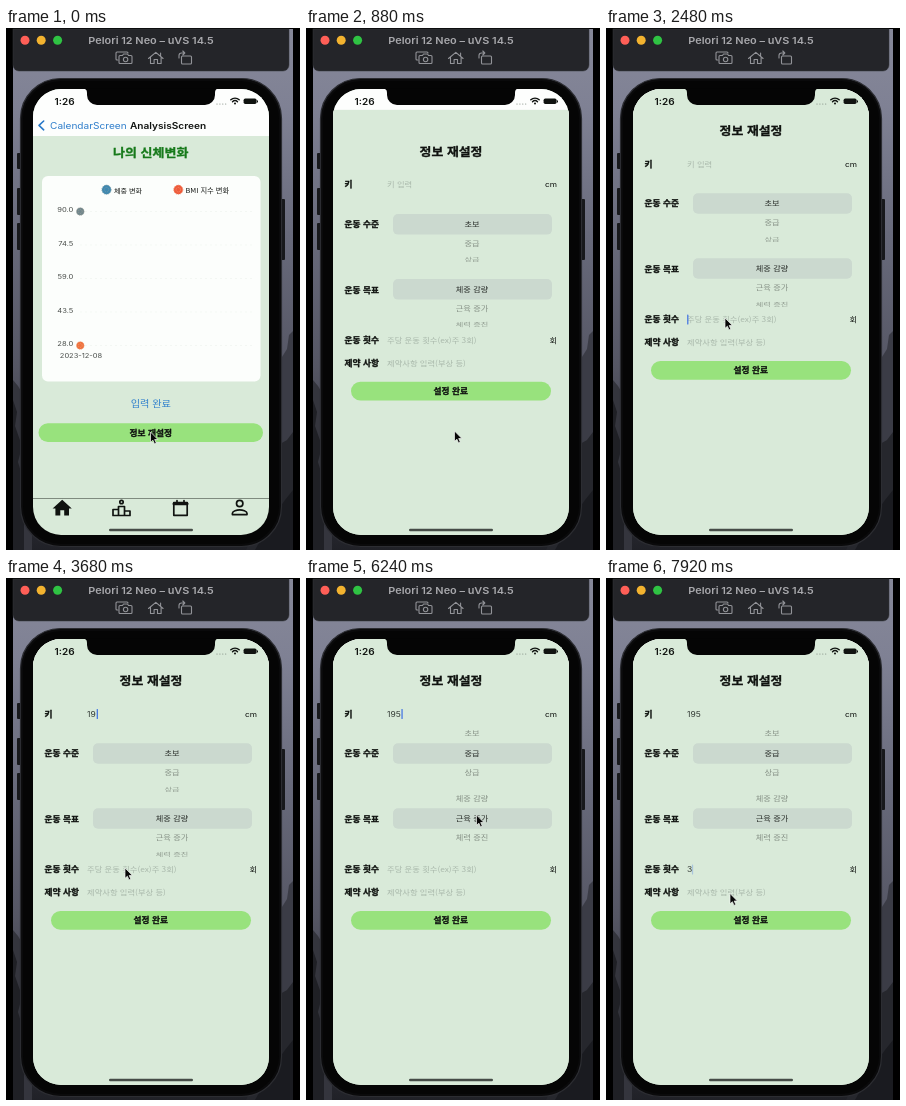
Animation of 294 by 522 pixels, one loop 8 s. Source, as an HTML page:

```html
<!DOCTYPE html>
<html lang="ko">
<head>
<meta charset="utf-8">
<title>Profile reset</title>
<style>
html, body { margin: 0; width: 100%; height: 100%; overflow: hidden; background: #000; }
svg { display: block; width: 294px; height: 522px; }
text { font-family: "Noto Sans CJK KR", "Noto Sans CJK", sans-serif; white-space: pre; }
.latin { font-family: Inter, "Open Sans", sans-serif; }
</style>
</head>
<body>
<svg id="stage" viewBox="0 0 294 522" xmlns="http://www.w3.org/2000/svg"></svg>
<script>
const LOOP = 8000;
const PAGE = '#d9ead9', BUTTON = '#98e27d', INK = '#101310', HINT = '#a9b8ab';
const ASPECT = 1.14;

const text = (x, y, width, str, o = {}) => {
  const size = width / ASPECT, fill = o.fill || INK;
  return `<text ${o.id ? `id="${o.id}"` : ''} class="${o.latin ? 'latin' : ''}"
    transform="translate(${x} ${(y + size * 0.37).toFixed(2)}) scale(${ASPECT} 1)"
    font-size="${size.toFixed(2)}" font-weight="${o.weight || 400}" fill="${fill}"
    ${o.weight === 900 ? `stroke="${fill}" stroke-width=".3"` : ''}
    text-anchor="${o.anchor || 'start'}">${str}</text>`;
};
const mid = (x, y, width, str, o = {}) => text(x, y, width, str, { anchor: 'middle', ...o });
const rect = (x, y, w, h, r, fill, extra = '') =>
  `<rect x="${x}" y="${y}" width="${w}" height="${h}" rx="${r}" fill="${fill}" ${extra}/>`;
const circle = (x, y, r, fill, extra = '') =>
  `<circle cx="${x}" cy="${y}" r="${r}" fill="${fill}" ${extra}/>`;
const path = (d, extra) => `<path d="${d}" ${extra}/>`;
const line = (color, w) =>
  `fill="none" stroke="${color}" stroke-width="${w}" stroke-linejoin="round" stroke-linecap="round"`;

// Spotted chart marker
const marker = (x, y, r, fill, dots) =>
  circle(x, y, r - 0.4, fill) +
  circle(x, y, r - 0.4, 'none', `stroke="${dots}" stroke-width="1" stroke-dasharray="1 1.1"`) +
  circle(x, y, r * 0.45, 'none', `stroke="${dots}" stroke-width=".8" stroke-dasharray=".9 1"`);

const wallpaper = () =>
  rect(7, 1, 280, 521, 0, 'url(#sky)') +
  path('M7 352l5 6 6 10 8 30v124H7z', 'fill="#34353d"') +
  path('M7 372l4 12-2 14 7 20-4 16 6 20v68H7z', 'fill="#1f2025"') +
  path('M287 303l-4 4-2 14-5 8-4 60v133h15z', 'fill="#3b3c46"') +
  path('M287 404l-6 8-7 4-14 60-20 46h47z', 'fill="#26272d"') +
  path('M287 462l-8 10-10 14-20 36h38z', 'fill="#1a1b20"');

const toolbar = () =>
  path('M7 1H283V37a6 6 0 0 1-6 6H13a6 6 0 0 1-6-6z', 'fill="#242529" stroke="#37383d" stroke-width=".5"') +
  circle(19, 12.2, 4.5, '#fe5f57') + circle(35.2, 12.2, 4.5, '#f3b32f') + circle(51.6, 12.2, 4.5, '#2fc343') +
  mid(145, 12, 10.9, 'Pelori 12 Neo – uVS 14.5', { latin: 1, weight: 600, fill: '#a9a9ad' }) +
  `<g ${line('#929398', 1.1)}>
    <path d="M112 32h-1a1 1 0 0 1-1-1v-6a1 1 0 0 1 1-1h10a1 1 0 0 1 1 1"/>
    <path d="M114 27.5h2.5l1-1.5h4l1 1.5h2.5a1 1 0 0 1 1 1v6a1 1 0 0 1-1 1h-11a1 1 0 0 1-1-1v-6a1 1 0 0 1 1-1z"/>
    <circle cx="119.6" cy="31.5" r="2.2"/>
    <path d="M142.5 30.5l7.3-6.2 7.3 6.2M144.5 29.5v6h3.6v-4h3.4v4h3.6v-6M154.6 25v2.5"/>
    <path d="M176.5 28h8a1 1 0 0 1 1 1v6a1 1 0 0 1-1 1h-8a1 1 0 0 1-1-1v-6a1 1 0 0 1 1-1z"/>
    <path d="M173 30v-2.5a2.5 2.5 0 0 1 2.5-2.5h3M176.8 23l2 2-2 2"/>
  </g>`;

const phone = () =>
  [[125, 16], [160, 27], [195, 27]].map(([y, h]) => rect(11, y, 5, h, 1, '#17181b')).join('') +
  rect(274, 171, 5, 61, 1, '#17181b') +
  rect(14.5, 50.5, 261, 468, 40, '#0a0a0b', 'stroke="#2c2d32" stroke-width="1.2"') +
  rect(17, 53, 256, 463, 38, '#050505');

const statusBar = () =>
  path('M76 60.5H213C210 60.5 209 62 209 65V67a10 10 0 0 1-10 10H91a10 10 0 0 1-10-10V65C81 62 80 60.5 76 60.5z', 'fill="#050505"') +
  text(48.5, 73.5, 10, '1:26', { latin: 1, weight: 600 }) +
  [0, 1, 2, 3].map(i => circle(211 + i * 2.9, 76, 0.6, '#7c877d')).join('') +
  path('M224.8 71.8a6 6 0 0 1 8.4 0M226.5 73.7a3.6 3.6 0 0 1 5 0', line(INK, 1.4)) +
  circle(229, 75.5, 1, INK) +
  rect(237.6, 70.6, 13, 5.4, 1.7, INK) + rect(251, 72.2, 1, 2.2, 0.5, INK);

const tabBar = () =>
  path('M27 470.5H263', 'stroke="#59645a" stroke-width=".7"') +
  path('M56.2 471.8L46.6 480.6H49.4V487.6H54.3V482.3H58.2V487.6H63V480.6H65.8z', `fill="${INK}"`) +
  `<g ${line(INK, 1.7)}>
    <path d="M107 487.5v-6h5.5v6zM112.5 487.5v-9h6v9zM118.5 487.5v-4.5h5.5v4.5z"/>
    <circle cx="115.5" cy="474" r="1.7"/>
    <path d="M167.8 474.5h13.4v12.8h-13.4zM171 474v-1.5M178 474v-1.5"/>
    <path d="M168 475.8h13" stroke-width="3"/>
    <circle cx="233.7" cy="475.5" r="3.2"/>
    <path d="M226.4 486.6v-1.3c0-2.3 4.6-3.500 7.300-3.500s7.300 1.200 7.300 3.500v1.300z"/>
  </g>`;

const chart = () => {
  const ticks = ['90.0', '74.5', '59.0', '43.5', '28.0'];
  return rect(36, 148, 218.5, 205.5, 6, '#fcfefc') +
    marker(100.5, 161.7, 5, '#3f88b0', '#7f9fa6') + text(108, 162.5, 7.1, '체중 변화') +
    marker(172.3, 161.7, 5, '#ee5a3a', '#f3a080') + text(179.5, 162.5, 7.3, 'BMI 지수 변화') +
    ticks.map((s, i) => {
      const y = 183.5 + i * 33.5;
      return path(`M74 ${y}H246`, 'stroke="#eef3ee" stroke-width=".6" stroke-dasharray="2 3"') +
        text(67.3, y - 1.5, 7.6, s, { latin: 1, anchor: 'end', fill: '#4b4f4c' });
    }).join('') +
    marker(74.3, 183.5, 4.2, '#6f868c', '#a3a39a') +
    marker(74.3, 317.5, 4.2, '#f0703c', '#eda47c') +
    mid(75, 328, 7.5, '2023-12-08', { latin: 1, fill: '#4b4f4c' });
};

const button = (x, y, w, s) =>
  rect(x, y, w, 18.8, 9.4, BUTTON) + mid(144.8, y + 9.7, 8.7, s, { weight: 900 });

const analysis = () =>
  rect(27, 61, 236, 446, 0, PAGE) +
  rect(27, 61, 236, 47, 0, '#fdfefd') +
  path('M37.7 93l-4.7 4.4 4.7 4.4', line('#2878c8', 1.6)) +
  text(44, 97.3, 10.1, 'CalendarScreen', { latin: 1, fill: '#2f7ecb' }) +
  text(124, 97.3, 10.1, 'AnalysisScreen', { latin: 1, weight: 600 }) +
  mid(144.7, 124.7, 13, '나의 신체변화', { weight: 900, fill: '#177a1b' }) +
  chart() +
  mid(144.8, 376, 10.2, '입력 완료', { fill: '#3180cc', weight: 500 }) +
  button(32.5, 395.3, 224.5, '정보 재설정') +
  tabBar();

const label = (y, s) => text(38.5, y, 8.7, s, { weight: 900 });
const field = (y, id, hint) =>
  text(81, y, 8.3, hint, { id: id + 'Hint', fill: HINT }) +
  text(81, y, 8.5, '', { id, latin: 1, fill: '#333a35' });

// Wheel picker: rows sit on a cylinder
const STEP = 0.427, RADIUS = 47;
const picker = (id, y, items) =>
  `<clipPath id="${id}Clip"><rect x="87" y="${y - 38.5}" width="160" height="77"/></clipPath>` +
  rect(87, y - 10.3, 159, 20.6, 5, '#cbd9cf') +
  `<g clip-path="url(#${id}Clip)" data-y="${y}" id="${id}">` +
  items.map(s => `<g>${mid(0, 0, 8.2, s)}</g>`).join('') + '</g>';

const form = () =>
  rect(27, 61, 236, 480, 0, PAGE) +
  mid(145, 103, 12.9, '정보 재설정', { weight: 900 }) +
  label(135.7, '키') + field(136, 'height', '키 입력') +
  text(239, 136, 8.3, 'cm', { latin: 1 }) +
  label(175, '운동 수준') + picker('level', 175.5, ['초보', '중급', '상급']) +
  label(241, '운동 목표') + picker('goal', 240.5, ['체중 감량', '근육 증가', '체력 증진']) +
  label(291, '운동 횟수') + field(291.3, 'count', '주당 운동 횟수(ex)주 3회)') +
  text(243.5, 291.5, 8.2, '회') +
  label(314.3, '제약 사항') + field(314.5, 'limits', '제약사항 입력(부상 등)') +
  button(45, 332.9, 200, '설정 완료') +
  rect(0, 0, 1.2, 10, 0.5, '#3b6fe3', 'id="caret"');

const stage = document.getElementById('stage');
stage.innerHTML = `
  <defs>
    <linearGradient id="sky" x1="0" y1="0" x2="0" y2="1">
      <stop offset="0" stop-color="#868899"/><stop offset=".15" stop-color="#7f8194"/>
      <stop offset=".4" stop-color="#686a7b"/><stop offset=".65" stop-color="#555664"/>
      <stop offset="1" stop-color="#202127"/>
    </linearGradient>
    <clipPath id="screen"><rect x="27" y="61" width="236" height="446" rx="28"/></clipPath>
  </defs>
  ${rect(0, 0, 294, 522, 0, '#000')}
  ${wallpaper()}${phone()}${toolbar()}
  <g clip-path="url(#screen)">${analysis()}<g id="form">${form()}</g></g>
  ${statusBar()}
  ${rect(103, 500.7, 84, 2.5, 1.25, '#464c47')}
  <path id="pointer" d="M0 0V10.3L2.4 8.2 4 11.9 5.8 11.1 4.2 7.5H7.4z"
    fill="#080808" stroke="#f4f6f4" stroke-width=".7" stroke-linejoin="round"/>`;

const el = id => document.getElementById(id);
const clamp = v => Math.min(1, Math.max(0, v));
const ramp = (t, a, b) => clamp((t - a) / (b - a));
const smooth = u => u * u * (3 - 2 * u);
const easeOut = u => 1 - (1 - u) ** 3;

// [time, x, y]
const route = [
  [0, 144.5, 404], [450, 144.5, 404], [850, 148.5, 403], [1200, 148.5, 403],
  [1800, 119, 290], [3980, 119, 290], [4230, 163, 250], [4550, 160, 229],
  [4860, 158, 178.5], [5080, 158, 178.5], [5200, 160, 191], [5520, 162, 171],
  [6000, 170.5, 237], [6450, 170.5, 237], [6900, 119, 290], [7400, 119, 290],
  [7780, 124, 315.5], [8000, 124, 315.5]
];
function pointerAt(t) {
  const i = route.findIndex((p, n) => n && t <= p[0]);
  const [t0, x0, y0] = route[i - 1], [t1, x1, y1] = route[i];
  const u = smooth(ramp(t, t0, t1));
  return [x0 + (x1 - x0) * u, y0 + (y1 - y0) * u];
}

function turn(id, pos) {
  const y = +el(id).dataset.y;
  [...el(id).children].forEach((row, i) => {
    const d = i - pos, a = d * STEP, near = clamp(1 - Math.abs(d));
    row.setAttribute('transform', `translate(166 ${y + RADIUS * Math.sin(a)}) scale(1 ${Math.cos(a)})`);
    row.setAttribute('opacity', 0.42 + 0.45 * near - 0.06 * Math.max(0, Math.abs(d) - 1));
  });
}

function fill(id, value) {
  el(id).textContent = value;
  el(id + 'Hint').setAttribute('visibility', value ? 'hidden' : 'visible');
}

function draw(t) {
  const drop = 446 * (1 - easeOut(ramp(t, 560, 1060)));
  el('form').setAttribute('transform', `translate(0 ${drop})`);

  const height = '195'.slice(0, [3300, 3560, 3800].filter(k => t >= k).length);
  const count = t >= 7280 ? '3' : '';
  fill('height', height);
  fill('count', count);

  turn('goal', smooth(ramp(t, 4250, 4750)));
  turn('level', smooth(ramp(t, 5220, 5750)));

  const onHeight = t >= 2900 && t < 6950;
  const typed = onHeight ? height : count;
  const caret = el('caret');
  caret.setAttribute('x', 81.2 + typed.length * 4.75);
  caret.setAttribute('y', onHeight ? 131 : 286.5);
  caret.setAttribute('opacity', t < 1850 ? 0 : clamp((0.95 - t % 1000 / 1000) / 0.1));

  el('pointer').setAttribute('transform', `translate(${pointerAt(t).join(' ')})`);
}

let start;
function frame(now) {
  start ??= now;
  draw((now - start) % LOOP);
  requestAnimationFrame(frame);
}
draw(0);
requestAnimationFrame(frame);
</script>
</body>
</html>
```
